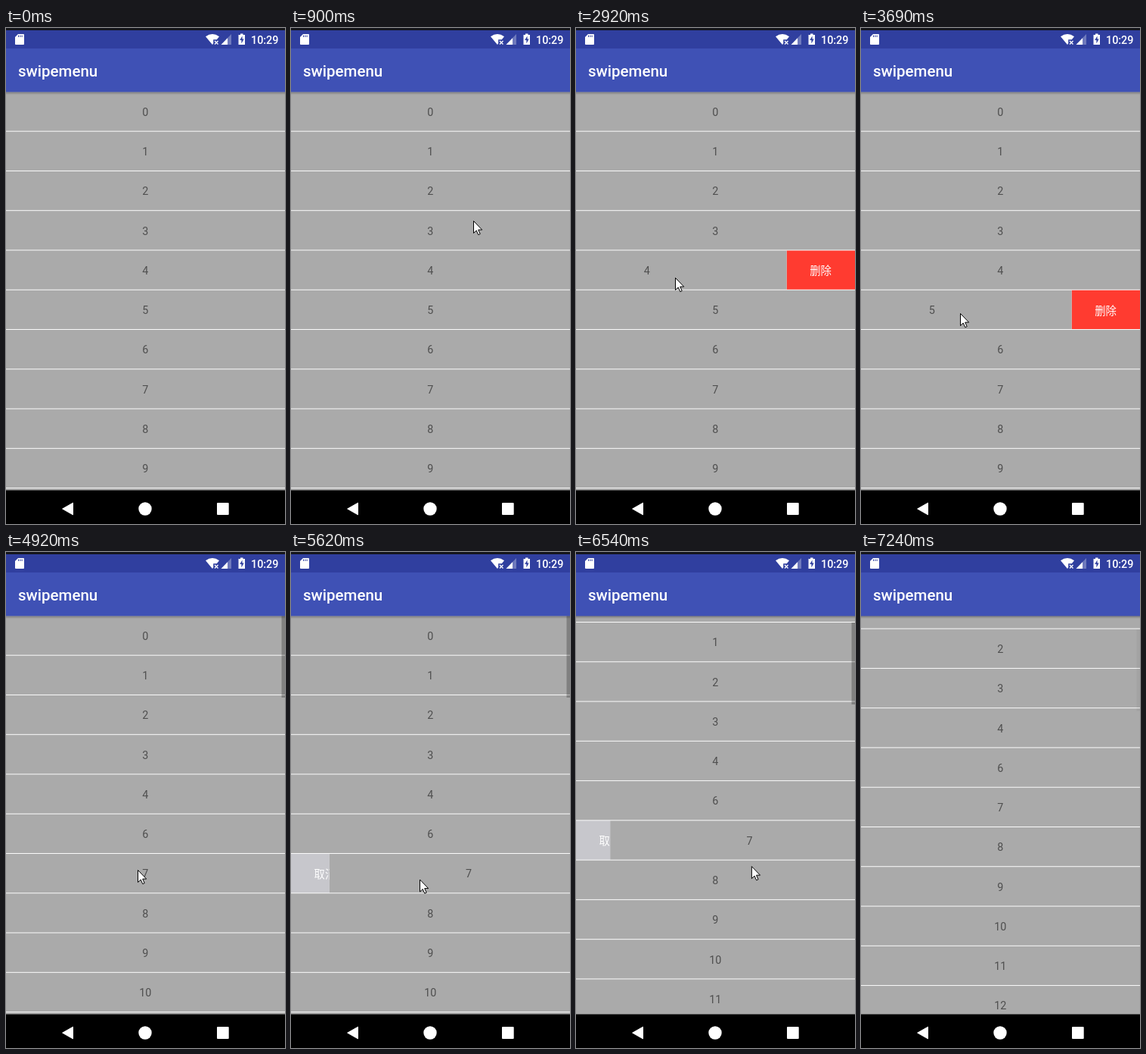
Animation, 369 px wide and 654 px high, one loop 7770 ms. Source, as an HTML page:

```html
<!DOCTYPE html>
<html lang="en">
<head>
<meta charset="utf-8">
<title>swipemenu</title>
<style>
  html, body { margin: 0; width: 100%; height: 100%; overflow: hidden; background: #000; }
  svg { display: block; width: 369px; height: 654px; }
  text { font: 14.35px Roboto, "Noto Sans CJK SC", "Noto Sans CJK", sans-serif; fill: #fff; }
  .mid { text-anchor: middle; }
  .number { fill: rgba(0, 0, 0, .54); }
  .clock { font-weight: 500; }
  .title { font-size: 20.5px; font-weight: 500; }
</style>
</head>
<body>
<svg viewBox="0 0 369 654">
  <defs>
    <linearGradient id="shade" x2="0" y2="1">
      <stop stop-opacity=".3"/>
      <stop offset="1" stop-opacity="0"/>
    </linearGradient>
  </defs>
  <rect width="369" height="654" fill="#fafafa"/>
  <g id="list"></g>
  <rect id="scrollbar" x="364.5" width="4.5" height="108"/>

  <rect y="84" width="369" height="4" fill="url(#shade)"/>
  <rect width="369" height="84.4" fill="#3f51b5"/>
  <rect width="369" height="27" fill="#303f9f"/>
  <rect width="369" height="3" fill="#15161c"/>
  <text class="title" x="16" y="64">swipemenu</text>

  <g fill="#fff">
    <path d="M16 8h7q1 0 1 1v12q0 1-1 1H13q-1 0-1-1V12z"/>
    <path d="M264 11.2q9-6.4 18 0l-3.2 4h-4.6v5.4l-1.2 1.4z"/>
    <path d="M276 17l4.5 4.5m0-4.5l-4.5 4.5" stroke="#fff" stroke-width="1.4"/>
    <path d="M284.5 22L298 8V22z" opacity=".3"/>
    <path d="M284.5 22L293 13.2V22z"/>
    <path d="M310 7.5h3.5V9H316v13h-8.5V9h2.5z"/>
  </g>
  <path d="M16.5 9.5v2.5m2.3-2.5v2.5m2.3-2.5v2.5" stroke="#303f9f"/>
  <path d="M312.5 10.5l-3.3 5.5h2.2v4.5l3.3-6h-2.2z" fill="#303f9f"/>
  <text class="clock" x="324" y="20.5">10:29</text>

  <rect y="609.5" width="369" height="44.5"/>
  <g fill="#fff">
    <path d="M74.7 634L88.5 626.2V641.8z" stroke="#fff" stroke-linejoin="round"/>
    <circle cx="184" cy="634" r="8.7"/>
    <rect x="279" y="626" width="15.7" height="16" rx="1"/>
  </g>
  <path id="cursor" d="M.5.5V16.5L4.2 13 6.8 18.7 9.2 17.6 6.7 12.1H11.7z" fill="#fff" stroke="#000"/>
</svg>
<script>
  const LOOP = 7770, FPS = 13, LAST = 94, WIDTH = 369;
  const TOP = 84.4, PITCH = 52.27, ROW = 51.25, MENU = 90.4;
  const DELETED = 5, DELETE_AT = 60, SCROLL_AT = 82, SCROLL_BY = 87.3;
  const OPEN_TIME = 3.7, CLOSE_TIME = 6, STROKE_TIME = 4;

  // Cursor stops: arrival frame, x, y.
  const stops = [
    [1, 284, 624], [5, 210, 385], [9, 241, 254], [17, 112, 268], [22, 279, 317],
    [27, 190, 318], [30, 131, 329], [42, 268, 364], [47, 131, 376], [53, 235, 383],
    [57, 312, 393], [61, 312, 393], [64, 174, 419], [69, 88, 418], [75, 252, 445],
    [80, 235, 509], [82, 231, 490], [86, 232, 400], [90, 320, 540], [94, 368, 665]
  ];
  // Side -1 swipes left, 1 swipes right.
  const swipes = {
    3: { side: -1, open: 13, close: 25 },
    4: { side: -1, open: 25, close: 42 },
    5: { side: -1, open: 43, close: DELETE_AT },
    7: { side: 1, open: 71, close: SCROLL_AT }
  };

  const $ = id => document.getElementById(id);
  const show = (node, on) => { node.style.display = on ? "" : "none"; };
  const move = (node, x, y) => node.setAttribute("transform", `translate(${x} ${y})`);

  // Smooth progress from 0 to 1, starting at a frame and lasting some frames.
  function ease(frame, start, length) {
    const u = Math.min(1, Math.max(0, (frame - start) / length));
    return u * u * (3 - 2 * u);
  }

  function cursorAt(frame) {
    const next = Math.max(1, stops.findIndex(([arrive]) => arrive >= frame));
    const [left, x0, y0] = stops[next - 1], [arrive, x1, y1] = stops[next];
    const start = Math.max(left, arrive - STROKE_TIME);
    const mix = ease(frame, start, arrive - start);
    return [x0 + (x1 - x0) * mix, y0 + (y1 - y0) * mix];
  }

  function swipeOffset(n, frame) {
    if (!swipes[n]) return 0;
    const { side, open, close } = swipes[n];
    return side * MENU * (ease(frame, open, OPEN_TIME) - ease(frame, close, CLOSE_TIME));
  }

  // The bar appears with the deletion, fades, and wakes again while scrolling.
  function barOpacity(frame) {
    if (frame < DELETE_AT) return 0;
    const fadeAt = frame <= SCROLL_AT ? SCROLL_AT - 1 : LAST - 1.5;
    return .25 * (1 - ease(frame, fadeAt, 2));
  }

  const rows = Array.from({ length: 13 }, (_, n) => {
    const side = swipes[n] ? swipes[n].side : 0;
    const center = side > 0 ? MENU / 2 : WIDTH - MENU / 2;
    const node = document.createElementNS("http://www.w3.org/2000/svg", "g");
    node.innerHTML = (side && `<rect class="menu" height="${ROW}" fill="${side > 0 ? "#c7c7cc" : "#ff3b30"}"/>
      <text class="mid" x="${center - .3}" y="31.8">${side > 0 ? "取消" : "删除"}</text>`) +
      `<g class="content"><rect width="${WIDTH}" height="${ROW}" fill="#aaa"/>
      <text class="mid number" x="184.3" y="31.4">${n}</text></g>`;
    if (!side) node.firstChild.nodeType === 3 && node.firstChild.remove();
    $("list").append(node);
    return { node, menu: node.querySelector(".menu"), content: node.querySelector(".content") };
  });

  function draw(frame) {
    const deleted = frame >= DELETE_AT;
    const scroll = SCROLL_BY * ease(frame, SCROLL_AT, 6);
    rows.forEach(({ node, menu, content }, n) => {
      const slot = n - (deleted && n > DELETED);
      const offset = swipeOffset(n, frame);
      show(node, !(deleted && n === DELETED));
      move(node, 0, TOP + slot * PITCH - scroll);
      move(content, offset, 0);
      if (!menu) return;
      menu.setAttribute("x", offset < 0 ? WIDTH + offset : 0);
      menu.setAttribute("width", Math.abs(offset));
      show(menu.nextElementSibling, offset);
    });
    $("scrollbar").setAttribute("y", 84 + scroll * 108 / 525);
    $("scrollbar").setAttribute("opacity", barOpacity(frame));
    show($("cursor"), frame > 0 && frame < LAST);
    move($("cursor"), ...cursorAt(frame));
  }

  function tick() {
    const t = performance.now() % LOOP;
    const lead = t < 2000 ? 25 : 12;
    draw(Math.min(LAST, Math.floor((t + lead) * FPS / 1000)));
    requestAnimationFrame(tick);
  }
  tick();
</script>
</body>
</html>
```
